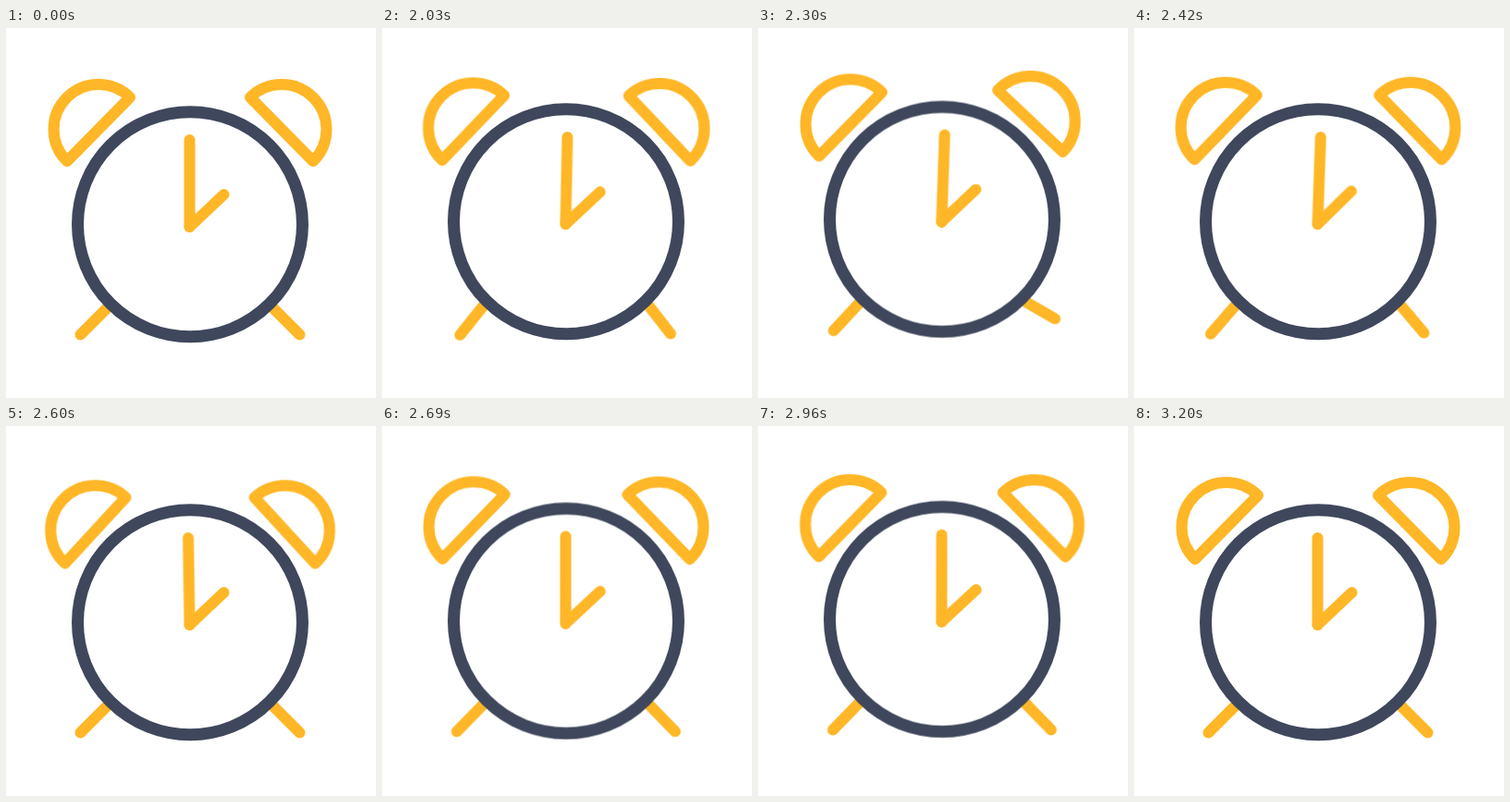
An HTML page that plays this animation: 400 by 400 pixels, repeating every 3.23 s.

```html
<!DOCTYPE html>
<html lang="en">
<head>
<meta charset="utf-8">
<title>Alarm clock</title>
<style>
  html, body { margin: 0; width: 100%; height: 100%; overflow: hidden; background: #fff; }
  svg { display: block; width: 100vw; height: 100vh; }

  .gold { stroke: #ffb727; }
  .ring { stroke: #3f475c; stroke-width: 13; fill: #fff; }

  /* still for 2030 ms, then two hops while the parts rattle */
  .body, .bell, .leg, .minute, .hour { animation: 3230ms ease-in-out infinite; }
  .body { animation-name: hop; }
  .bell { transform-origin: 199px 212px; }
  .leg { transform-origin: 113px 299px; }
  .minute, .hour { transform-origin: 198.5px 215px; }
  .left .bell { animation-name: bell-left; }
  .right .bell { animation-name: bell-right; }
  .left .leg { animation-name: leg-left; }
  .right .leg { animation-name: leg-right; }
  .minute { animation-name: minute; }
  .hour { animation-name: hour; }

  @keyframes hop {
    0%, 62.84% { transform: translateY(0); }
    62.85% { transform: translateY(-3px); }
    71.21% { transform: translateY(-5.5px); }
    74.92% { transform: translateY(-3px); }
    79.5%, 80.5% { transform: translateY(0); }
    87% { transform: translateY(-4px); }
    88.8% { transform: translateY(-5.5px); }
    95.36%, 100% { transform: translateY(0); }
  }
  @keyframes bell-left {
    0%, 62.84% { transform: rotate(0deg); }
    62.85% { transform: rotate(-.8deg); }
    71.21% { transform: rotate(0deg); }
    74.92% { transform: rotate(-.5deg); }
    80.5% { transform: rotate(-1.9deg); }
    87% { transform: rotate(1.7deg); }
    95.5% { transform: rotate(-1.6deg); }
    99.07%, 100% { transform: rotate(0deg); }
  }
  @keyframes bell-right {
    0%, 62.84% { transform: rotate(0deg); }
    62.85% { transform: rotate(-1.15deg); }
    71.21% { transform: rotate(2deg); }
    74.92% { transform: rotate(-.5deg); }
    80.5% { transform: rotate(-1.95deg); }
    87% { transform: rotate(1.5deg); }
    95.5% { transform: rotate(-1.6deg); }
    99.07%, 100% { transform: rotate(0deg); }
  }
  @keyframes leg-left {
    0%, 62.84% { transform: rotate(0deg); }
    62.85% { transform: rotate(-6.4deg); }
    71.21% { transform: rotate(-2.2deg); }
    74.92% { transform: rotate(-4.2deg); }
    80.5% { transform: rotate(0deg); }
    87% { transform: rotate(-1.8deg); }
    95.36%, 100% { transform: rotate(0deg); }
  }
  @keyframes leg-right {
    0%, 62.84% { transform: rotate(0deg) translate(0, 0); }
    62.85% { transform: rotate(-7deg) translate(1.5px, -1.5px); }
    71.21% { transform: rotate(15deg) translate(3px, -3px); }
    74.92% { transform: rotate(-4.8deg) translate(1.4px, -1.4px); }
    80.5% { transform: rotate(0deg) translate(0, 0); }
    87% { transform: rotate(-2deg) translate(.3px, -.3px); }
    95.36%, 100% { transform: rotate(0deg) translate(0, 0); }
  }
  @keyframes minute {
    0%, 62.84% { transform: rotate(0deg); }
    62.85% { transform: rotate(1.2deg); }
    71.21%, 74.92% { transform: rotate(2deg); }
    80.5% { transform: rotate(-.9deg); }
    87% { transform: rotate(1.5deg); }
    95.5% { transform: rotate(-.9deg); }
    99.07%, 100% { transform: rotate(0deg); }
  }
  @keyframes hour {
    0%, 62.84% { transform: rotate(0deg); }
    62.85% { transform: rotate(.4deg); }
    71.21% { transform: rotate(0deg); }
    74.92% { transform: rotate(-1deg); }
    80.5% { transform: rotate(0deg); }
    87% { transform: rotate(1.2deg); }
    95.5%, 100% { transform: rotate(0deg); }
  }
</style>
</head>
<body>
<svg viewBox="0 0 400 400" fill="none" stroke-width="12" stroke-linecap="round" stroke-linejoin="round">
  <g class="body">
    <g class="gold left">
      <path class="bell" d="M134 75A48.4 48.4 0 0 0 66 144Z"/>
      <path class="leg" d="M113 299L80.5 331.5"/>
    </g>
    <g class="gold right" transform="matrix(-1 0 0 1 398 0)">
      <path class="bell" d="M134 75A48.4 48.4 0 0 0 66 144Z"/>
      <path class="leg" d="M113 299L80.5 331.5"/>
    </g>
    <circle class="ring" cx="199" cy="212.3" r="121.5"/>
    <g class="gold">
      <path class="minute" d="M198.5 121V215"/>
      <path class="hour" d="M198.5 215L235.5 180"/>
    </g>
  </g>
</svg>
</body>
</html>
```
